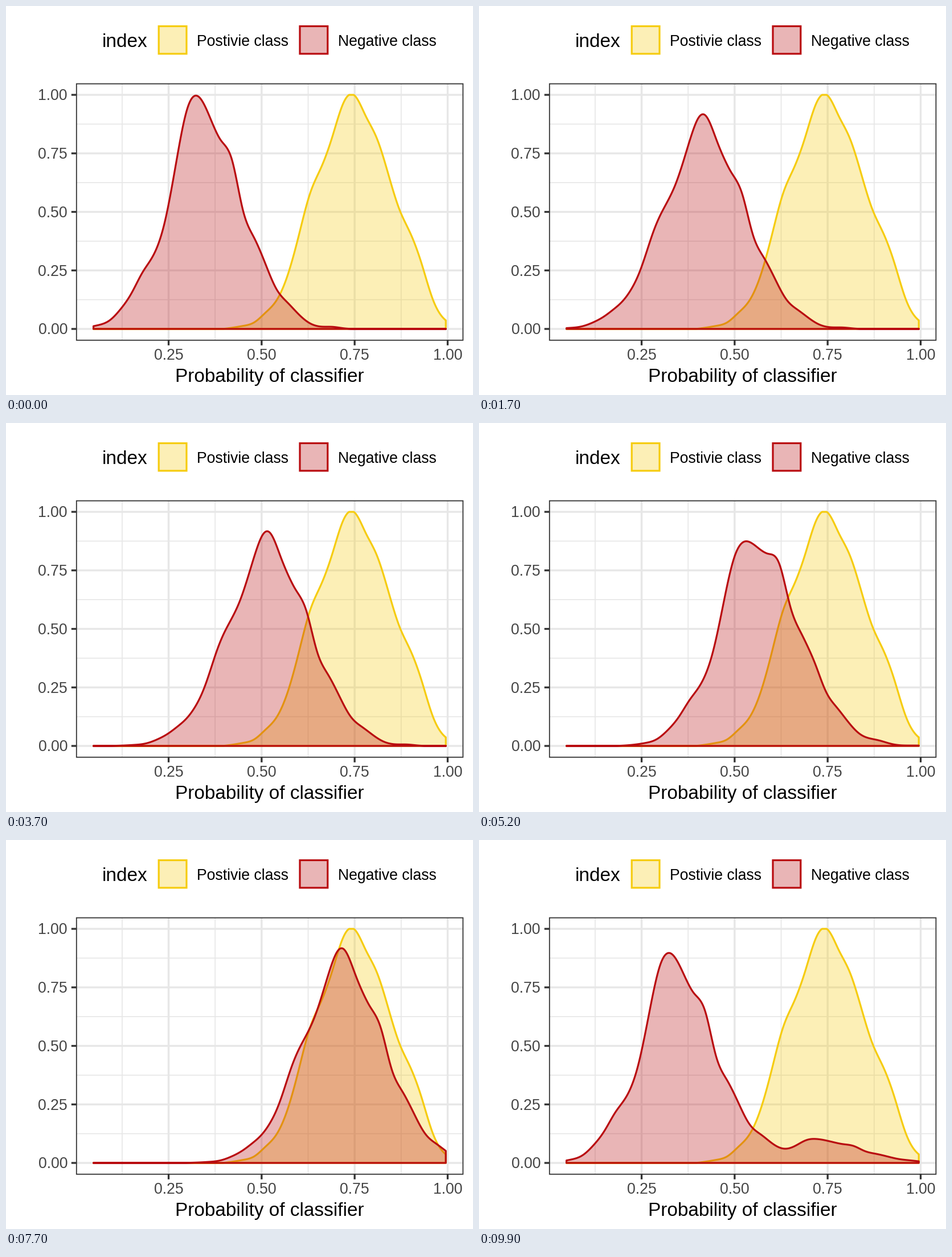
Recreate the animation shown at these times as a matplotlib script. Size 820 px wide and 683 px high, loop 10000 ms.

```python
import numpy as np
import matplotlib.pyplot as plt
from matplotlib.animation import FuncAnimation
from matplotlib.patches import Polygon, Rectangle

W, H, DPI = 820, 683, 64
PT = 72 / DPI                      # points per pixel
FRAMES, INTERVAL = 100, 100
HOLD, MOVE, STATES = 10, 10, 5     # frames at rest, frames in motion, number of poses
SHIFT = 0.1                        # step of the red density between poses

YELLOW, RED = "#F6CC10", "#B90C10"
GRID, AXIS, LABEL = "#E7E7E7", "#333333", "#444444"
BIG, SMALL = 33.33, 26.67
LEFT, TOP, RIGHT, BOTTOM = 123.8, 136.6, 802.4, 586.8

# Key heights of each density, one every 0.03 along x
KNOT_STEP = 0.03
RED_START, YELLOW_START = 0.0, 0.39
RED_KEYS = [.002, .007, .016, .035, .083, .152, .242, .318, .459, .708, .940, .993,
            .908, .807, .724, .506, .389, .279, .170, .112, .062, .024, .010, .009, .003]
YELLOW_KEYS = [0, .005, .013, .028, .069, .122, .230, .400, .578, .690, .821, .966,
               .997, .909, .813, .664, .512, .408, .279, .127, .044, .017, .003]


def to_px(x):
    return 122.2 + 653.3 * x


def to_py(y):
    return 567 - 411 * y


def spline(x, start, keys):
    """Natural cubic spline through evenly spaced keys, zero outside them."""
    y = np.pad(keys, 2)
    n = len(y)
    curve = np.zeros(n)
    system = 4 * np.eye(n - 2) + np.eye(n - 2, k=1) + np.eye(n - 2, k=-1)
    curve[1:-1] = np.linalg.solve(system, np.diff(y, 2))
    pos = np.clip((x - start) / KNOT_STEP + 2, 0, n - 1)
    i = np.minimum(pos.astype(int), n - 2)
    b = pos - i
    a = 1 - b
    value = a * y[i] + b * y[i + 1] + (a**3 - a) * curve[i] + (b**3 - b) * curve[i + 1]
    return np.clip(value, 0, 1)


xs = np.linspace(0.048, 0.995, 512)
poses = [spline(xs - k * SHIFT, RED_START, RED_KEYS) for k in range(STATES)]
yellow = spline(xs, YELLOW_START, YELLOW_KEYS)


def outline(heights):
    px = to_px(xs)
    curve = np.column_stack([px, to_py(heights)])
    return np.vstack([(px[0], to_py(0)), curve, (px[-1], to_py(0))])


fig = plt.figure(figsize=(W / DPI, H / DPI), dpi=DPI, facecolor="white")
ax = fig.add_axes([0, 0, 1, 1])
ax.set_xlim(0, W)
ax.set_ylim(H, 0)
ax.axis("off")


def line(xa, ya, xb, yb, color, width, z):
    ax.plot([xa, xb], [ya, yb], color=color, lw=width * PT, zorder=z,
            solid_capstyle="butt", snap=False)


def text(x, y, s, size, color="black", ha="left"):
    ax.text(x, y, s, fontsize=size * PT, color=color, ha=ha, va="baseline",
            family="Liberation Sans", zorder=8)


def paint(patch, color, z, join="round"):
    patch.set(facecolor=(color, 0.3), edgecolor=color, linewidth=3.2 * PT,
              joinstyle=join, snap=False, zorder=z)
    return ax.add_patch(patch)


# Panel, grid and axes: major lines every 0.25, minor ones between
for k in range(9):
    v, major = k / 8, k % 2 == 0
    px, py = to_px(v), to_py(v)
    width, z = (3.4, 2) if major else (1.7, 1)
    line(LEFT, py, RIGHT, py, GRID, width, z)
    if major:
        line(LEFT - 9, py, LEFT, py, AXIS, 3.3, 6)
        text(108, py + 9.4, f"{v:.2f}", SMALL, LABEL, "right")
    if px > LEFT:
        line(px, TOP, px, BOTTOM, GRID, width, z)
        if major:
            line(px, BOTTOM, px, BOTTOM + 9, AXIS, 3.3, 6)
            text(px, 621.3, f"{v:.2f}", SMALL, LABEL, "center")
ax.add_patch(Rectangle((LEFT, TOP), RIGHT - LEFT, BOTTOM - TOP, fill=False,
                       edgecolor=AXIS, lw=1.8 * PT, snap=False, zorder=7))
text(462.8, 660, "Probability of classifier", BIG, ha="center")

# Legend
text(169, 72, "index", BIG)
for x, color, name in ((268.2, YELLOW, "Postivie class"),
                       (516, RED, "Negative class")):
    paint(Rectangle((x, 35.5), 48.8, 48.4), color, 4, "miter")
    text(x + 66.6, 70, name, SMALL)

# Densities
paint(Polygon(outline(yellow), closed=True), YELLOW, 4)
red = paint(Polygon(outline(poses[0]), closed=True), RED, 5)


def update(n):
    state, step = divmod(n, HOLD + MOVE)
    w = max(0, step - HOLD) / MOVE
    following = poses[(state + 1) % STATES]
    red.set_xy(outline((1 - w) * poses[state] + w * following))
    return [red]


anim = FuncAnimation(fig, update, frames=FRAMES, interval=INTERVAL,
                     repeat=True, repeat_delay=0, blit=False)
plt.show()
```
